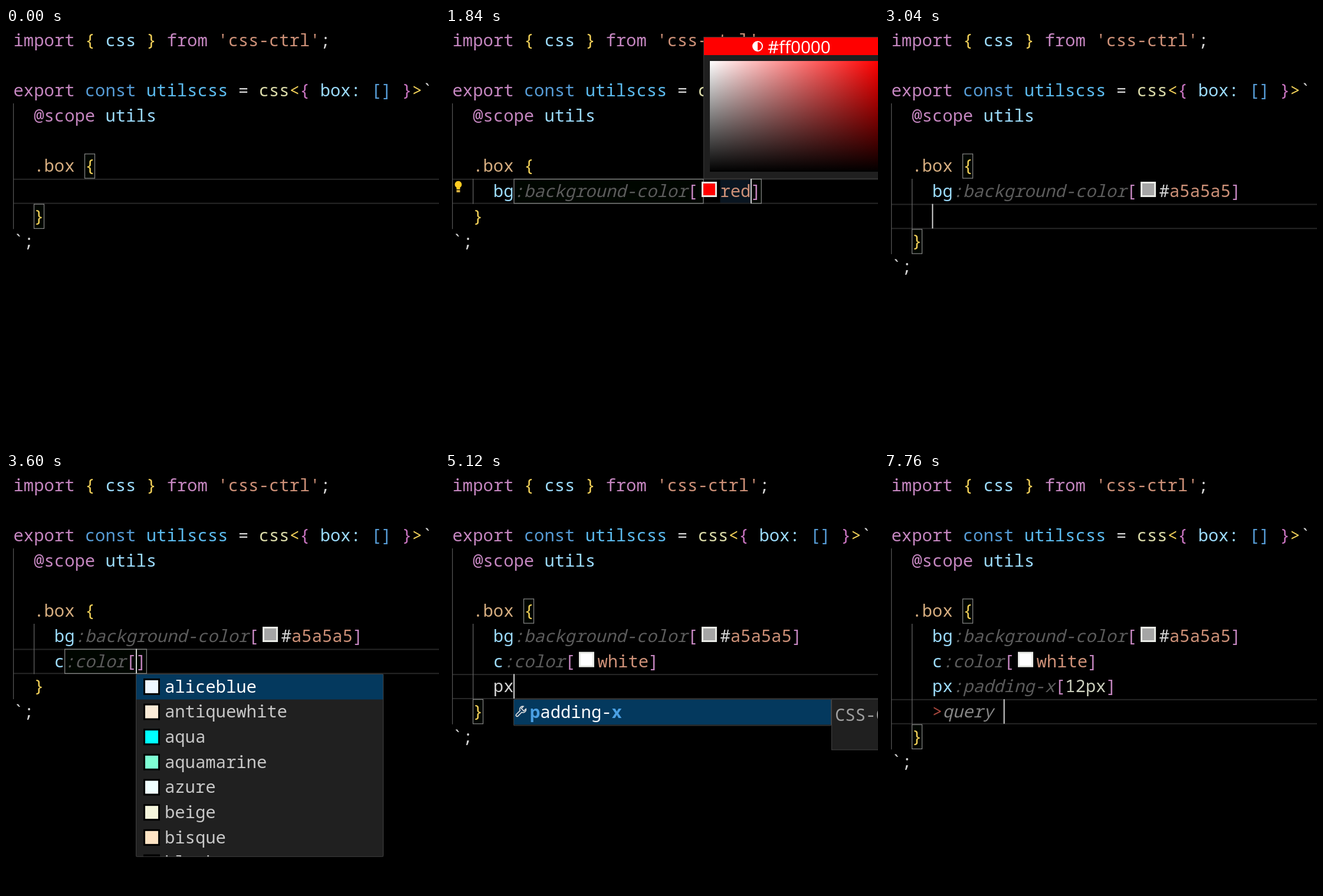
These frames come from a looping animation (734 px wide and 708 px high, 8 s). An HTML page:

```html
<!DOCTYPE html>
<html lang="en">
<head>
<meta charset="utf-8">
<title>Editor typing</title>
<style>
  html, body { margin: 0; width: 100%; height: 100%; overflow: hidden; background: #000; }
  svg { display: block; }
  text { white-space: pre; font: 500 28.88px "Noto Sans Mono", "DejaVu Sans Mono", monospace; }
  .hint { font-style: italic; }
  .match { font-weight: 700; }
  .header { font: 29.5px "Open Sans", "Noto Sans", sans-serif; }
</style>
</head>
<body>
<svg id="stage" width="734" height="708" viewBox="0 0 734 708">
  <defs>
    <linearGradient id="saturation"><stop stop-color="#fff"/><stop offset="1" stop-color="#f00"/></linearGradient>
    <linearGradient id="shade" x2="0" y2="1"><stop stop-opacity="0"/><stop offset="1"/></linearGradient>
  </defs>
  <g id="scene"></g>
</svg>
<script>
const LOOP = 8000, LEFT = 12.5, CHAR = 17.33, LINE = 42.667, SWATCH = 38;
const C = {
  key: '#c586c0', brace: '#f0cf58', name: '#9cdcfe', str: '#ce9178', plain: '#d4d4d4',
  blue: '#569cd6', cnst: '#5cbcf0', fn: '#dcdcaa', sel: '#d7ae80', hint: '#5c5c5c',
  num: '#ccd0bd', pair: '#c874c0'
};
const HINTS = { bg: 'background-color', c: 'color', px: 'padding-x' };
const COLORS = {
  aliceblue: '#f0f8ff', antiquewhite: '#faebd7', aqua: '#0ff', aquamarine: '#7fffd4', azure: '#f0ffff',
  beige: '#f5f5dc', bisque: '#ffe4c4', black: '#000', rebeccapurple: '#639', red: '#f00',
  rosybrown: '#bc8f8f', royalblue: '#4169e1', white: '#fff', whitesmoke: '#f5f5f5', wheat: '#f5deb3'
};
const list = s => s.split(' ');
const ALL = Object.keys(COLORS).slice(0, 8);
const B_LIST = list('background border bottom box-shadow box-sizing border-radius backdrop-filter blur');
const C_LIST = list('color content cursor clear clip column-gap caret-color columns');
const P_LIST = list('padding padding-x padding-y padding-top position perspective padding-left place-items');

// Each step replaces the whole editing state.
const STEPS = [
  [0, { done: 0, empty: true, caret: false }],
  [240, { done: 0, prop: 'b', popup: B_LIST }],
  [320, { done: 0, prop: 'bg', popup: ['background-color'] }],
  [400, { done: 0, prop: 'bg', value: '' }],
  [480, { done: 0, prop: 'bg', value: '', popup: ALL }],
  [640, { done: 0, prop: 'bg', value: 'r', popup: list('rebeccapurple red rosybrown royalblue') }],
  [720, { done: 0, prop: 'bg', value: 're', popup: list('rebeccapurple red royalblue') }],
  [880, { done: 0, prop: 'bg', value: 'red', popup: ['red'] }],
  [1040, { done: 0, prop: 'bg', value: 'red' }],
  [1200, { done: 0, prop: 'bg', value: 'red', swatch: '#f00' }],
  [1360, { done: 0, prop: 'bg', value: 'red', swatch: '#f00', bulb: true }],
  [1680, { done: 0, prop: 'bg', value: 'red', swatch: '#f00', bulb: true, picker: true }],
  [2720, { done: 0, prop: 'bg', value: '#a5a5a5', swatch: '#a5a5a5' }],
  [2800, { done: 0, prop: 'bg', value: '#a5a5a5', swatch: '#a5a5a5', past: true }],
  [2880, { done: 1 }],
  [3280, { done: 1, caret: false }],
  [3440, { done: 1, prop: 'c', popup: C_LIST }],
  [3520, { done: 1, prop: 'c', value: '' }],
  [3600, { done: 1, prop: 'c', value: '', popup: ALL }],
  [3680, { done: 1, prop: 'c', value: 'w', popup: list('wheat white whitesmoke') }],
  [3840, { done: 1, prop: 'c', value: 'wh', popup: list('wheat white whitesmoke') }],
  [3920, { done: 1, prop: 'c', value: 'whi', popup: list('white whitesmoke') }],
  [4000, { done: 1, prop: 'c', value: 'whit', popup: list('white whitesmoke') }],
  [4080, { done: 1, prop: 'c', value: 'white', popup: list('white whitesmoke') }],
  [4320, { done: 1, prop: 'c', value: 'white' }],
  [4480, { done: 1, prop: 'c', value: 'white', swatch: '#fff' }],
  [4640, { done: 1, prop: 'c', value: 'white', swatch: '#fff', past: true }],
  [4720, { done: 2 }],
  [4960, { done: 2, prop: 'p', popup: P_LIST }],
  [5120, { done: 2, prop: 'px', popup: ['padding-x'] }],
  [5440, { done: 2, prop: 'px', value: '' }],
  [5840, { done: 2, prop: 'px', value: '1' }],
  [6080, { done: 2, prop: 'px', value: '12' }],
  [6160, { done: 2, prop: 'px', value: '12p' }],
  [6240, { done: 2, prop: 'px', value: '12px' }],
  [6640, { done: 2, prop: 'px', value: '12px', past: true }],
  [6960, { done: 3 }],
  [7280, { done: 3, caret: false }],
  [7600, { done: 3, prop: '>' }],
  [7680, { done: 3, query: true }]
];
const DONE = [
  { prop: 'bg', value: '#a5a5a5', swatch: '#a5a5a5' },
  { prop: 'c', value: 'white', swatch: '#fff' },
  { prop: 'px', value: '12px' }
];

const colX = col => LEFT + col * CHAR;
const rowY = row => row * LINE;
const rect = (x, y, w, h, fill, more = '') =>
  `<rect x="${x}" y="${y}" width="${w}" height="${h}" fill="${fill}" ${more}/>`;
const escape = s => s.replace(/</g, '&lt;').replace(/>/g, '&gt;');
const text = (x, y, s, fill, cls = '') =>
  `<text x="${x}" y="${y}" fill="${fill}" class="${cls}">${escape(s)}</text>`;

function line(row, col, tokens) {
  let out = '';
  for (const [s, fill, cls] of tokens) {
    out += text(colX(col), rowY(row) + 31, s, fill, cls);
    col += s.length;
  }
  return out;
}

function bracketBox(x1, x2, row) {
  return rect(x1 + .5, rowY(row) + .5, x2 - x1, LINE - 1.4, 'rgb(0,100,0)',
    'fill-opacity=".06" stroke="#888" stroke-width="1.2"');
}

function header() {
  return line(0, 0, [['import', C.key], [' { ', C.brace], ['css', C.name], [' } ', C.brace],
      ['from ', C.key], ["'css-ctrl'", C.str], [';', C.plain]]) +
    line(2, 0, [['export ', C.key], ['const ', C.blue], ['utilscss', C.cnst], [' = ', C.plain],
      ['css', C.fn], ['<', C.brace], ['{ ', C.pair], ['box: ', C.name], ['[]', C.blue],
      [' }', C.pair], ['>', C.brace], ['`', C.plain]]) +
    line(3, 2, [['@scope ', C.key], ['utils', C.name]]) +
    line(5, 2, [['.box ', C.sel], ['{', C.brace]]);
}

function declaration(row, { prop, value, swatch }, active) {
  const hint = ':' + HINTS[prop];
  const hintX = colX(4 + prop.length);
  const open = hintX + (hint.length + 1) * CHAR;
  const start = open + (swatch ? SWATCH : 0);
  const end = start + value.length * CHAR;
  const y = rowY(row) + 31;
  let out = active
    ? bracketBox(hintX, open + (swatch ? 9 : 0), row) + bracketBox(end, end + CHAR, row) : '';
  out += line(row, 4, [[prop, C.name], [hint, C.hint, 'hint'], ['[', C.key]]);
  if (swatch) out += rect(open + 8, rowY(row) + 6.5, 23, 23, swatch, 'stroke="#e9ebe6" stroke-width="3"');
  const isHex = value[0] === '#';
  if (isHex) out += text(start, y, '#', C.plain);
  out += text(start + (isHex ? CHAR : 0), y, isHex ? value.slice(1) : value, prop === 'px' ? C.num : C.str);
  out += text(end, y, ']', C.key);
  return { out, start, end };
}

function label(x, y, s, typed, fill) {
  let i = 0, out = '';
  [...s].forEach((ch, n) => {
    const hit = i < typed.length && ch === typed[i];
    if (hit) i++;
    out += text(x + n * CHAR, y, ch, hit ? '#4aa0e4' : fill, hit ? 'match' : '');
  });
  return out;
}

function wrench(x, y) {
  return `<g transform="translate(${x} ${y}) rotate(45)" fill="none" stroke="#e0e0e0" stroke-width="1.6">
    <path d="M-2 -1V8a2 2 0 0 0 4 0V-1A5 5 0 0 0 3 -10V-5H-3V-10A5 5 0 0 0 -2 -1Z"/></g>`;
}

function popup(x, row, items, typed, isColor) {
  const top = rowY(row + 1) - .5;
  const height = Math.min(items.length * LINE + 3.3, 311);
  const width = isColor ? 420 : 539;
  let body = rect(0, 0, width, height, '#202020') + rect(0, 1, width, LINE, '#04395e');
  items.forEach((item, n) => {
    const y = n * LINE + 1;
    body += isColor
      ? rect(14.5, y + 8.5, 25, 25, COLORS[item], 'stroke="#000" stroke-width="3"')
      : wrench(12, y + 21);
    body += label(isColor ? 49 : 28, y + 31, item, typed, n ? '#c8c8c8' : '#fff');
  });
  body += rect(.5, .5, width - 1, height - 1, 'none', 'stroke="#454545" rx="2"');
  let out = `<svg x="${x}" y="${top}" width="${width}" height="${height}">${body}</svg>`;
  if (!isColor) {
    out += rect(x + width + .5, top + .5, 300, 86, '#202020', 'stroke="#454545"') +
      text(x + width + 6, top + 37, 'CSS-Ctrl', '#a0a0a0');
  }
  return out;
}

// Drag from pure red toward a neutral grey.
function dragColor(k) {
  const v = 255 - 90 * k;
  return [v, v * k, v * k].map(Math.round);
}
const hex = rgb => '#' + rgb.map(n => n.toString(16).padStart(2, '0')).join('');

function picker(k) {
  const [r, g, b] = dragColor(k);
  const color = hex([r, g, b]);
  const ink = (r * 299 + g * 587 + b * 114) / 1000 >= 128 ? '#000' : '#fff';
  let out = rect(438.5, 15.5, 320, 240, '#1f1f1f', 'stroke="#383838"') +
    rect(439, 16, 320, 30, color) +
    `<circle cx="530" cy="31" r="8" fill="none" stroke="${ink}" stroke-width="2"/>` +
    `<path d="M530 23a8 8 0 0 0 0 16z" fill="${ink}"/>` +
    text(547, 43, color, ink, 'header') +
    rect(449, 56, 285, 188, 'url(#saturation)') + rect(449, 56, 285, 188, 'url(#shade)');
  if (k > 0) {
    out += `<circle cx="${734 - 285 * k}" cy="${56 + 66 * k}" r="8" fill="none" stroke="#fff" stroke-width="2"/>`;
  }
  return out;
}

const bulb = y => `<g transform="translate(22.5 ${y})" fill="#ffcc22">
  <path d="M-3 11V8A6 6 0 1 1 3 8V11Z"/>${rect(-3, 12, 6, 4, '#d8b040')}</g>`;

function render(state, k) {
  const row = 6 + state.done, close = row + 1;
  let out = rect(13, rowY(row) - .2, 721, 2, '#272727') + rect(13, rowY(close) - 2, 721, 2, '#272727') +
    rect(12, 128, 1.2, rowY(close + 1) - 128, '#565656');
  if (!state.empty) out += rect(47, 256, 1.2, rowY(close) - 256, '#666');

  const recognised = state.value !== undefined;
  if (!recognised) out += bracketBox(133, 150, 5) + bracketBox(47, 64, close);
  out += header() + line(close, 2, [['}', C.brace]]) + line(close + 1, 0, [['`;', C.plain]]);
  DONE.slice(0, state.done).forEach((d, n) => out += declaration(6 + n, d).out);

  let caretX = colX(4);
  if (recognised) {
    const moved = state.picker && k > 0;
    const color = hex(dragColor(k));
    const current = moved ? { ...state, value: color, swatch: color } : state;
    const d = declaration(row, current, true);
    if (state.picker) out += rect(d.start, rowY(row) + 2, d.end - d.start, LINE - 4, '#264f78', 'fill-opacity=".28"');
    out += d.out;
    caretX = d.end + (state.past ? CHAR : 0);
  } else if (state.query) {
    out += line(row, 4, [['>', '#a8483e'], ['query', '#858585', 'hint']]);
    caretX = colX(11);
  } else if (state.prop) {
    out += line(row, 4, [[state.prop, C.plain]]);
    caretX += state.prop.length * CHAR;
  }
  if (state.bulb) out += bulb(rowY(row) + 7);
  if (state.caret !== false) out += rect(caretX - .5, rowY(row), 2, LINE - 1, '#d0d0d0');
  if (state.popup) out += popup(caretX - .5, row, state.popup, recognised ? state.value : state.prop, recognised);
  if (state.picker) out += picker(k);
  return out;
}

const scene = document.getElementById('scene');
let shown = '';
function draw(now) {
  const t = now % LOOP;
  const index = STEPS.findLastIndex(([start]) => start <= t);
  const drag = Math.min(1, Math.max(0, (Math.floor(t / 80) * 80 - 1840) / 480));
  const key = index + ':' + drag;
  if (key !== shown) {
    shown = key;
    scene.innerHTML = render(STEPS[index][1], drag);
  }
}
const origin = performance.now();
function tick() {
  draw(performance.now() - origin);
  requestAnimationFrame(tick);
}
tick();
</script>
</body>
</html>
```
